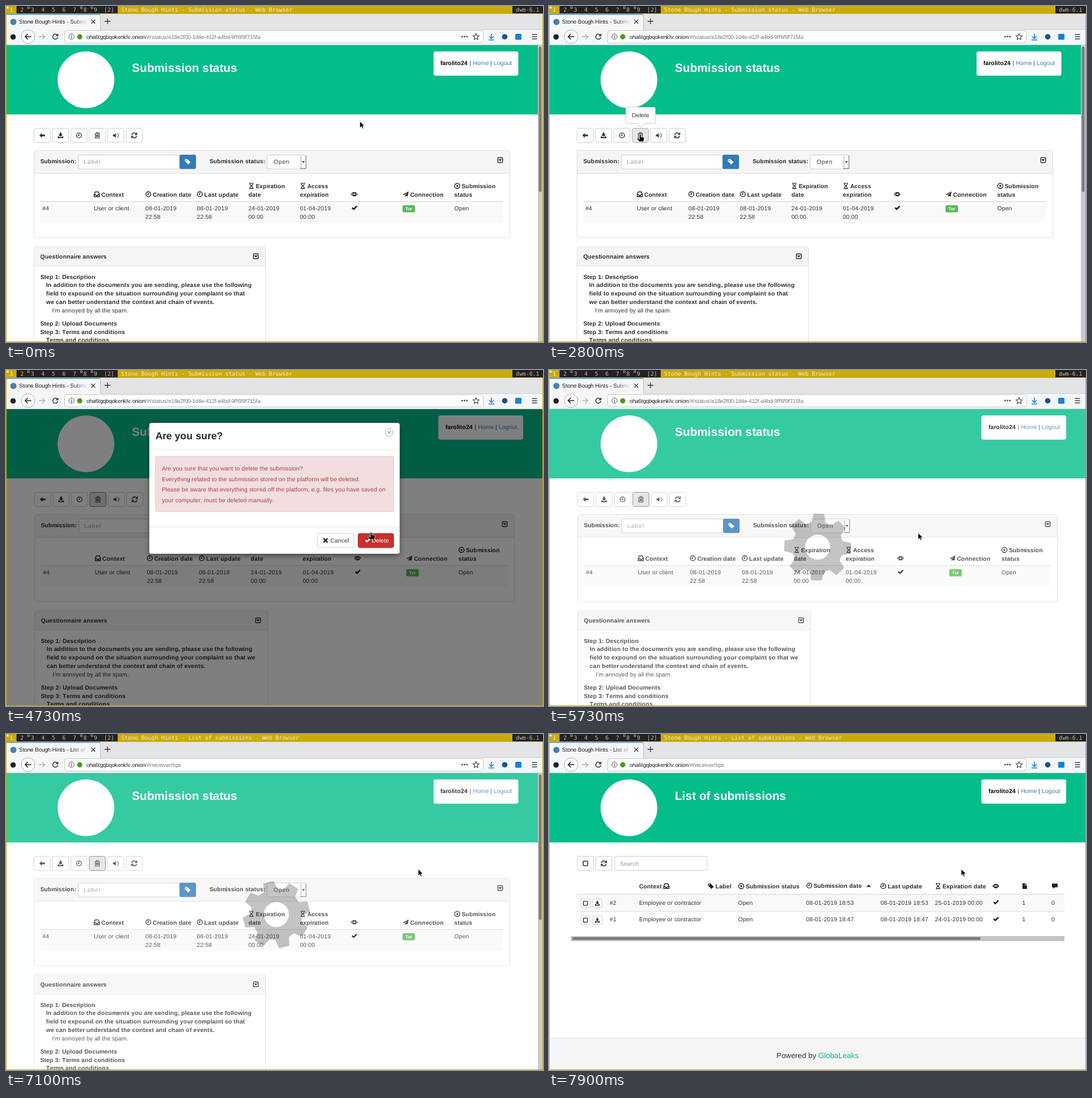
An HTML page that plays this animation: 947x592 px, repeating every 8 s.

```html
<!DOCTYPE html>
<html lang="en">
<head>
<meta charset="utf-8">
<title>Submission status</title>
<style>
html, body { margin: 0; width: 100%; height: 100%; overflow: hidden; background: #fff; }
svg { display: block; width: 947px; height: 592px; }
text { font-family: "Liberation Sans", Arial, sans-serif; fill: #333; white-space: pre; text-rendering: geometricPrecision; }
.b { font-weight: bold; fill: #2b2b2b; }
.m { font-family: "DejaVu Sans Mono", monospace; fill: #bbb; }
.u { fill: #1c1c1e; }
.h { font-weight: bold; fill: #fff; }
.a { fill: #337ab7; }
.r { fill: #a94442; }
.w { fill: #fff; }
</style>
</head>
<body>
<svg id="stage" viewBox="0 0 947 592"></svg>
<script>
const GREEN = '#03bd8b', GOLD = '#cbaa0c', PALE = '#f3ecd0';
const APP = 'Stone Bough Hints', USER = 'farolito24';
const ZOOM = .74; // a 1280x800 screen shown at 947x592

// Glyphs advance by whole screen pixels, as in hinted text
const pen = document.createElement('canvas').getContext('2d');
const SIZES = { m: 13.33, u: 13.33, h: 28 };
const widths = {};
function advance(ch, cls, px) {
  const key = cls + ch;
  if (!(key in widths)) {
    pen.font = cls === 'm' ? '100px "DejaVu Sans Mono", monospace'
      : (cls === 'b' || cls === 'h' ? 'bold ' : '') + '100px "Liberation Sans", Arial, sans-serif';
    widths[key] = pen.measureText(ch).width / 100;
  }
  return Math.round(widths[key] * px);
}
// align: 0 start, .5 middle, 1 end
function text(x, y, s, cls = '', { px = SIZES[cls] || 14, align = 0, gap = 0, fill = '' } = {}) {
  const steps = [...String(s)].map(ch => (advance(ch, cls, px) + gap) * ZOOM);
  let at = x - align * steps.reduce((a, b) => a + b, 0);
  const xs = steps.map(w => { const left = at; at += w; return left.toFixed(2); });
  return `<text x="${xs.join(' ')}" y="${y}" class="${cls}" font-size="${px * ZOOM}"${fill && ` style="fill:${fill}"`}>${s}</text>`;
}

const box = (x, y, w, h, fill, stroke = 'none', r = 0, extra = '') =>
  `<rect x="${x}" y="${y}" width="${w}" height="${h}" rx="${r}" fill="${fill}" stroke="${stroke}" ${extra}/>`;
const disc = (x, y, r, fill, stroke = 'none') => `<circle cx="${x}" cy="${y}" r="${r}" fill="${fill}" stroke="${stroke}"/>`;
const line = (d, color, w = 1) => `<path d="${d}" fill="none" stroke="${color}" stroke-width="${w}"/>`;
const group = (id, body = '') => `<g id="${id}">${body}</g>`;
const ring = r => `M${-r} 0a${r} ${r} 0 1 0 ${2 * r} 0a${r} ${r} 0 1 0 ${-2 * r} 0`;

// Each icon is centred on 0,0: path and stroke width (0 = filled)
const ICONS = {
  back: ['M-5 0L-.5-4.3V-1.4H5V1.4H-.5V4.3Z', 0],
  save: ['M-1.5-5H1.5V-1.5H4L0 2.5-4-1.5H-1.5ZM-5 1.8H-2.8L-1 3.4H1L2.8 1.8H5V5H-5Z', 0],
  clock: [ring(4.4) + 'M0-2.8V.4H-2.2', 1.4],
  trash: ['M-4.6-3.3H4.6M-1.6-3.5V-5H1.6V-3.5M-3.6-3V4.7H3.6V-3M-1.5-1.4V3M0-1.4V3M1.5-1.4V3', 1.1],
  sound: ['M-5-1.6H-3L0-4V4L-3 1.6H-5ZM1.2-1.8Q2.8 0 1.2 1.8ZM2.4-3.4Q6.4 0 2.4 3.4L3 4.2Q7.6 0 3-4.2Z', 0],
  sync: ['M-4.2-.8A4.3 4.3 0 0 1 3.4-2.8M4.6-5V-1.6H1.2M4.2.8A4.3 4.3 0 0 1-3.4 2.8M-4.6 5V1.6H-1.2', 1.5],
  tag: ['M-5-4.5H-.6L5 1 1 5-5-.7ZM-3-3.2a.9.9 0 1 0 .1 0Z', 0],
  caret: ['M-3.2-4.2H3.2Q4.2-4.2 4.2-3.2V3.2Q4.2 4.2 3.2 4.2H-3.2Q-4.2 4.2-4.2 3.2V-3.2Q-4.2-4.2-3.2-4.2ZM-1.8-.9H1.8L0 1Z', 1.4],
  inbox: ['M-2.8-4.2H2.8L4.6.6V4.2H-4.6V.6ZM-4.6.9H-2L-1 2.5H1L2 .9H4.6', 1.5],
  glass: ['M-3.8-4.8H3.8M-3.8 4.8H3.8M-2.8-4.8Q-2.8-1.5 0 0Q2.8-1.5 2.8-4.8M-2.8 4.8Q-2.8 1.5 0 0Q2.8 1.5 2.8 4.8M-1.5 4H1.5', 1.1],
  eye: ['M-5.2 0Q0-6.5 5.2 0Q0 6.5-5.2 0ZM0-2.3a2.1 2.1 0 1 0 .1 0Z', 1.3],
  plane: ['M5-5L3.2 4.3 .2 2.8-1.5 5V2L3-3-3 1.4-5.2.3Z', 0],
  target: [ring(4.5) + ring(1), 1.4],
  check: ['M-5 .3L-3.2-1.5-1.4.2 3.3-4.3 5-2.6-1.4 3.7Z', 0],
  cross: ['M-3.6-3.6L3.6 3.6M3.6-3.6L-3.6 3.6', 2.6],
  square: ['M-3-4H3Q4-4 4-3V3Q4 4 3 4H-3Q-4 4-4 3V-3Q-4-4-3-4Z', 1.6],
  file: ['M-4-5H.5V-1H4V5H-4ZM1.3-5L4-2H1.3Z', 0],
  chat: ['M-5-4.5H5V2H.5L-2.5 5V2H-5Z', 0],
  reload: ['M3.6-2.6A4.5 4.5 0 1 0 4.4 1M4.6-5V-1.4H1', 1.5],
  star: ['M0-5L1.5-1.6 5.2-1.3 2.4 1.1 3.3 4.8 0 2.8-3.3 4.8-2.4 1.1-5.2-1.3-1.5-1.6Z', 1.1]
};
function icon(name, x, y, color = '#2b2b2b', k = 1) {
  const [d, w] = ICONS[name];
  const paint = w ? `fill="none" stroke="${color}" stroke-width="${w}"` : `fill="${color}" fill-rule="evenodd"`;
  return `<path transform="translate(${x} ${y}) scale(${k})" d="${d}" ${paint}/>`;
}
const button = (x, y, w, h, name, cls = '', k = 1) =>
  box(x, y, w, h, '#fff', '#ccc', 3, `class="${cls}"`) + icon(name, x + w / 2, y + h / 2, '#333', k);

function head(title, wide) {
  const x = wide ? 763 : 754;
  return box(0, 68.8, 947, 122.2, GREEN) + disc(141, 130, 50, '#fff') + text(222, 116, title, 'h') +
    box(x - (wide ? .5 : 0), 80, 149.5, 42.8, '#fff', 'none', 4) +
    text(x + 60, 104, USER, 'b', { align: 1, fill: '#000' }) + text(x + 63.5, 104, '|') +
    text(x + 69.5, 104, 'Home', 'a') + text(x + 100, 104, '|') + text(x + 106, 104, 'Logout', 'a');
}

function statusPage(wide) {
  const L = wide ? 50 : 49, R = wide ? 897 : 889, half = wide ? 462 : 458;
  const col = k => L + 15.2 + k * (wide ? 91.6 : 90.8);
  let s = head('Submission status', wide);
  ['back', 'save', 'clock', 'trash', 'sound', 'sync'].forEach((n, i) => {
    s += button(L + .5 + i * 32.45, 215.5, 28.5, 25, n, n === 'trash' ? 'bin' : '');
  });
  s += box(L + .5, 254.5, R - L - 1, 153.5, '#fff', '#ddd', 3) + box(L + 1, 255, R - L - 2, 40, '#f5f5f5') +
    line(`M${L} 295H${R}`, '#ddd') + text(L + 11.5, 277, 'Submission:', 'b') +
    box(L + 78.5, 262.5, 179, 24.5, '#fff', '#ccc', 3) + text(L + 88, 278.2, 'Label', '', { gap: 1, fill: '#999' }) +
    box(L + 257.4, 262.4, 28.2, 24.4, '#337ab7', '#2e6da4', 2, 'stroke-width=".8"') + icon('tag', L + 271.5, 274.3, '#fff') +
    text(L + 310, 277, 'Submission status:', 'b') + box(L + 411.5, 262.5, 68, 24.5, '#fff', '#ccc', 2) +
    text(L + 423, 278.2, 'Open', '', { gap: .8 }) +
    line(`M${L + 471} 264V286M${L + 470} 286.5H${L + 480}V263`, '#777') + line(`M${L + 470.5} 264V286`, '#e3e3e3') +
    `<path d="M${L + 473} 273.5h5l-2.5 3z" fill="#222"/>` + icon('caret', R - 17.5, 271.5);
  s += box(L + 11.5, 345, R - L - 24, 36, '#f9f9f9') + line(`M${L + 11.5} 344.5H${R - 12}`, '#ddd', 1.5);

  const heads = [[1, 'inbox', 'Context'], [2, 'clock', 'Creation date'], [3, 'clock', 'Last update'],
    [4, 'glass', 'Expiration', 'date'], [5, 'glass', 'Access', 'expiration'], [6, 'eye', ''],
    [7, 'plane', 'Connection'], [8, 'target', 'Submission', 'status']];
  for (const [k, n, a, b] of heads) {
    const y = b ? 321 : 335.7;
    s += icon(n, col(k) + 5.2, y - 4, '#222') + text(col(k) + 13, y, a, 'b');
    if (b) s += text(col(k), 335.7, b, 'b');
  }
  const cells = ['#4', 'User or client', '08-01-2019', '08-01-2019', '24-01-2019', '01-04-2019', '', '', 'Open'];
  cells.forEach((c, k) => s += text(col(k), 359.8, c));
  ['22:58', '22:58', '00:00', '00:00'].forEach((c, k) => s += text(col(k + 2), 374.6, c));
  s += icon('check', col(6) + 5.5, 356, '#111') + box(col(7) - .5, 351, 22, 12.5, '#5cb85c', 'none', 2) +
    text(col(7) + 10.5, 360.2, 'Tor', 'b', { px: 10.5, align: .5, fill: '#fff' });

  s += box(L + .5, 424, half - L - 1, 180, '#fff', '#ddd', 3) + box(L + 1, 424.5, half - L - 2, 33, '#f5f5f5') +
    line(`M${L} 458H${half}`, '#ddd') + text(L + 11.5, 445, 'Questionnaire answers', 'b') + icon('caret', half - 17.5, 441);
  const we = wide ? [' we', ''] : ['', 'we '];
  [[0, 480.5, 'Step 1: Description'],
    [10.3, 495.3, 'In addition to the documents you are sending, please use the following'],
    [10.3, 510.1, 'field to expound on the situation surrounding your complaint so that' + we[0]],
    [10.3, 524.9, we[1] + 'can better understand the context and chain of events.'],
    [20.7, 539.7, "I'm annoyed by all the spam."], [0, 563, 'Step 2: Upload Documents'],
    [0, 577.6, 'Step 3: Terms and conditions'], [10.3, 592.2, 'Terms and conditions']
  ].forEach(([x, y, c], i) => s += text(L + 11.5 + x, y, c, i === 4 ? '' : 'b'));
  if (!wide) s += box(938, 68.8, 9, 523.2, '#c9c9c9') + box(939.5, 71.5, 5, 256, '#7d7d7d', 'none', 2.5);
  return s;
}

function listPage() {
  let s = head('List of submissions', true) + button(50, 215.5, 28.5, 25, 'square') + button(82.5, 215.5, 28.5, 25, 'sync') +
    box(116, 215.5, 163, 25, '#fff', '#ccc', 3) + text(125, 232, 'Search', '', { fill: '#999' });
  [[159, 'Context', 207, 'inbox'], [293.5, 'Label', 285.5, 'tag'], [347, 'Submission status', 339, 'target'],
    [466.5, 'Submission date', 459, 'clock'], [597.5, 'Last update', 589.5, 'clock'], [694, 'Expiration date', 686, 'glass'],
    [0, '', 788, 'eye'], [0, '', 839, 'file'], [0, '', 892, 'chat']
  ].forEach(([x, c, ix, n]) => {
    const y = n === 'clock' && x < 500 ? 271 : 272;
    s += text(x, y, c, 'b') + icon(n, ix, y - 4, '#222');
  });
  s += '<path d="M559.5 269.5h8.5l-4.250-4z" fill="#222"/>' + box(49.5, 283, 859.5, 29, '#f9f9f9') +
    line('M49.5 282.5H909', '#ddd', 1.5) + line('M49.5 312.5H909', '#ddd');
  [[300.5, '#2', '18:53', '25'], [330.2, '#1', '18:47', '24']].forEach(([y, id, at, day]) => {
    s += button(56, y - 10, 16.5, 15.5, 'square', '', .9) + button(77, y - 10, 16.5, 15.5, 'save', '', .85) +
      text(107, y, id) + text(159, y, 'Employee or contractor') + text(333.5, y, 'Open') +
      text(453.3, y, '08-01-2019 ' + at) + text(584.5, y, '08-01-2019 ' + at) + text(680.5, y, day + '-01-2019 00:00') +
      icon('check', 788.5, y - 3.8, '#111') + text(834.5, y, '1') + text(886, y, '0');
  });
  return s + box(38.5, 356, 870.5, 9, '#c4c4c4') + box(41, 358, 720, 4.8, '#7a7a7a', 'none', 2.4) +
    box(0, 535, 947, 57, '#f5f5f5') + line('M0 535.5H947', '#e5e5e5') +
    text(401, 571.3, 'Powered by', '', { px: 18 }) + text(475, 571.3, 'GlobaLeaks', '', { px: 18, fill: GREEN });
}

function chrome() {
  let s = box(0, 0, 947, 13.3, '#222') + box(0, 0, 18.5, 13.3, GOLD) + box(197, 0, 696, 13.3, GOLD) + box(0, 13.3, 947, 1, GOLD);
  for (let i = 1; i < 10; i++) s += text(6.6 + (i - 1) * 18.55, 10.2, i, 'm', { fill: i < 2 ? PALE : '' });
  s += box(1, 1, 3.5, 3.5, PALE);
  for (const x of [38, 131.5, 150]) s += box(x, 1.5, 3, 3, 'none', '#bbb', 0, 'stroke-width=".8"');
  s += text(173, 10.2, '[2]', 'm') + group('title') + text(899, 10.2, 'dwm-6.1', 'm');
  s += box(0, 14.1, 947, 28, '#e3e4e6') + box(1, 14.1, 165.5, 28, '#f5f6f7') + box(1, 14.1, 165.5, 1.4, '#2a8be8') +
    line('M166.5 16V41', '#bbb') + line('M166 41.5H947', '#d0d0d2') + disc(13, 28, 5.5, '#4d7fa8') +
    group('tab') + box(116, 18, 28, 20, 'url(#fade)') + box(144, 18, 20, 20, '#f5f6f7') +
    line('M150.5 24.2L157.2 31M157.2 24.2L150.5 31', '#333', 1.2) + line('M174 27H184M179 22V32', '#333', 1.3);
  s += box(0, 42, 947, 26.8, '#f5f6f7') + line('M0 68.4H947', '#c4c4c6', .74) + disc(12.5, 54.5, 4.8, '#222') +
    disc(39, 54, 12, '#fff', '#aaa') + line('M44.5 54H34M38.5 49.3L33.8 54L38.5 58.7', '#222', 1.6) +
    line('M58 54H68.5M64 49.5L68.5 54L64 58.5', '#b4b4b6', 1.5) + icon('reload', 87, 54, '#333') +
    box(103.5, 43.5, 738, 21.5, '#fff', '#c6c6c8', 3) + disc(115.5, 54, 4.7, 'none', '#555') +
    line('M115.5 53V57M115.5 51V52.2', '#555', 1.2) + disc(130, 54.3, 4.6, '#4b9a1c') +
    text(142, 57.7, 'oha6tgqbqokenklv.onion', 'u') + group('path');
  for (let i = 0; i < 3; i++) s += disc(804.5 + i * 4.2, 54, 1.4, '#444') + line(`M927.5 ${50.3 + i * 3.8}H936.5`, '#333', 1.4);
  return s + icon('star', 829, 54, '#444', 1.05) + line('M856 48.5V57M852 53.5L856 57.3L860 53.5M851 59.7H861', '#1080e8', 1.6) +
    disc(879.5, 54.2, 4.8, '#14528c') + box(898, 49, 11, 10.5, '#1583d8', 'none', 1.5);
}

const modal = box(1, 68.8, 945, 522.2, '#000', 'none', 0, 'opacity=".5"') +
  box(252.5, 93, 442, 231, '#fff', 'rgba(0,0,0,.25)', 4, 'filter="url(#soft)"') +
  text(263.5, 122, 'Are you sure?', 'b', { px: 24 }) +
  disc(675.8, 110, 6.9, 'none', '#aaa') + line('M673 107.2L678.6 112.8M678.6 107.2L673 112.8', '#aaa', 1.4) +
  line('M253 140H694M253 276.3H694', '#e5e5e5') + box(263.5, 152, 420, 97.5, '#f2dede', '#ebccd1', 3) +
  ['Are you sure that you want to delete the submission?',
    'Everything related to the submission stored on the platform will be deleted.',
    'Please be aware that everything stored off the platform, e.g. files you have saved on',
    'your computer, must be deleted manually.'].map((c, i) => text(275, 177 + i * 18.55, c, 'r')).join('') +
  box(549, 288, 64.5, 25, '#fff', '#ccc', 3) + icon('cross', 563.5, 300.3) + text(572, 304.3, 'Cancel') +
  box(621, 288, 62.5, 25, '#d9534f', '#d43f3a', 3, 'id="del"') + icon('check', 638, 300.5, '#fff') + text(645, 304.3, 'Delete', 'w');

function cog() {
  let d = '';
  for (let i = 0; i < 8; i++) {
    const a = i * Math.PI / 4;
    for (const [x, y] of [[-12.3, -43.5], [-9.3, -58.8], [9.3, -58.8], [12.3, -43.5]])
      d += `${d ? 'L' : 'M'}${(x * Math.cos(a) - y * Math.sin(a)).toFixed(1)} ${(x * Math.sin(a) + y * Math.cos(a)).toFixed(1)}`;
  }
  return `<path d="${d}Z${ring(22)}" fill-rule="evenodd" opacity=".23"/>`;
}

const stage = document.getElementById('stage');
stage.innerHTML = `<defs><linearGradient id="fade"><stop stop-color="#f5f6f7" stop-opacity="0"/><stop offset="1" stop-color="#f5f6f7"/></linearGradient>
  <filter id="soft" x="-5%" y="-5%" width="110%" height="115%"><feDropShadow dx="0" dy="3" stdDeviation="5" flood-opacity=".45"/></filter></defs>` +
  group('narrow', statusPage(false)) + group('wide', statusPage(true)) + group('list', listPage()) +
  group('modal', modal) + group('busy', box(0, 68.8, 938, 523.2, '#fff', 'none', 0, 'id="veil" opacity=".2"') + group('cog', cog())) +
  group('tip', '<path d="M139 178H184Q188 178 188 182V203Q188 207 184 207H168.5L162 213.5L155.5 207H139Q135 207 135 203V182Q135 178 139 178Z" fill="#fff" stroke="rgba(0,0,0,.22)"/>' +
    text(161.5, 196.3, 'Delete', '', { align: .5 })) +
  chrome() + line('M.5 14V591.5H946.5V14', GOLD) +
  group('arrow', '<path d="M0 0V11.6L2.7 9.2L4.6 13.3L6.5 12.4L4.7 8.4H8.2Z" stroke="#fff" stroke-width=".7"/>') +
  group('hand', '<path d="M-1.5 1Q-.2-.8 1 1V4.5L5.5 5.4Q7 6 6.7 8L5.5 13H-2L-5.5 8.5Q-5.5 6.5-3.5 7.3L-1.5 9Z" stroke="#fff" stroke-width=".7"/>');

const el = {};
stage.querySelectorAll('[id]').forEach(n => el[n.id] = n);
const bins = stage.querySelectorAll('.bin');
const show = (n, on) => n.setAttribute('display', on ? 'inline' : 'none');
const clamp = v => Math.max(0, Math.min(1, v));
function paint(n, fill, stroke) { n.setAttribute('fill', fill); n.setAttribute('stroke', stroke); }
function write(n, html) { if (n.said !== html) n.innerHTML = n.said = html; }

// Pointer track: time, x, y
const TRACK = [[0, 624, 203], [500, 624, 203], [620, 590, 172], [760, 480, 133], [900, 340, 122], [1050, 220, 129],
  [1180, 165, 150], [1300, 180, 174], [1440, 166, 211], [1570, 161, 218], [1720, 161, 226], [4070, 161, 226],
  [4250, 250, 233], [4430, 430, 256], [4620, 600, 279], [4800, 651, 287], [5900, 651, 287], [6100, 694, 256],
  [6300, 727, 238], [8000, 727, 238]];
function pointer(t) {
  let i = 0;
  while (i < TRACK.length - 2 && t >= TRACK[i + 1][0]) i++;
  const p = TRACK[i], q = TRACK[i + 1], h = q[0] - p[0], u = (t - p[0]) / h;
  const slope = (j, c) => {
    const a = TRACK[j - 1], b = TRACK[j], d = TRACK[j + 1];
    if (!a || !d || (a[1] === b[1] && a[2] === b[2]) || (d[1] === b[1] && d[2] === b[2])) return 0;
    return (d[c] - a[c]) / (d[0] - a[0]);
  };
  return [1, 2].map(c => {
    const u2 = u * u, u3 = u2 * u;
    return (2 * u3 - 3 * u2 + 1) * p[c] + (u3 - 2 * u2 + u) * h * slope(i, c) +
      (3 * u2 - 2 * u3) * q[c] + (u3 - u2) * h * slope(i + 1, c);
  });
}

function draw(t) {
  const listed = t >= 7230, wide = t >= 3570 && t < 5760, moved = t >= 6700;
  show(el.list, listed);
  show(el.wide, wide);
  show(el.narrow, !wide && !listed);
  show(el.modal, t >= 3570 && t < 5700);

  const name = moved ? 'List of submissions' : 'Submission status';
  write(el.title, text(203, 10.2, `${APP} - ${name} - Web Browser`, 'm', { fill: PALE }));
  write(el.tab, text(23, 31.2, `${APP} - ${moved ? 'List of' : 'Submiss'}`, 'u'));
  write(el.path, text(245.6, 57.7, '/#/' + (moved ? 'receiver/tips' : 'status/e18e2f00-1d4e-412f-a4bd-9ff6f9f715fa'), 'u', { fill: '#77777a' }));

  const [x, y] = pointer(t);
  const over = t >= 1330 && t < 3570 && y > 214;
  const bin = t >= 3430 ? ['#e0e0e0', '#777'] : t >= 3230 ? ['#d4d4d4', '#8c8c8c'] : over ? ['#e6e6e6', '#adadad'] : ['#fff', '#ccc'];
  bins.forEach(n => paint(n, ...bin));
  const onDelete = t > 4070 && t < 5700 && x > 621 && y > 281;
  paint(el.del, ...(t >= 5500 && t < 5530 ? ['#ac2925', '#761c19'] : onDelete ? ['#c9302c', '#ac2925'] : ['#d9534f', '#d43f3a']));

  const hand = (over && t < 3430) || onDelete;
  show(el.hand, hand);
  show(el.arrow, !hand);
  (hand ? el.hand : el.arrow).setAttribute('transform', `translate(${x.toFixed(2)} ${y.toFixed(2)})`);
  el.tip.setAttribute('opacity', clamp((t - 1600) / 160) * clamp((3870 - t) / 270));

  const full = wide || listed;
  show(el.busy, t >= 5700 && t < 7900);
  el.veil.setAttribute('width', full ? 947 : 938);
  // the spinner stalls briefly while the address changes
  const turn = (t - 5725 - 164 * clamp((t - 6600) / 164)) * .36;
  el.cog.setAttribute('transform', `translate(${full ? 473.5 : 469} 320) rotate(${turn.toFixed(2)}) translate(0 -8)`);
}

function tick(now) {
  draw(now % 8000);
  requestAnimationFrame(tick);
}
draw(0);
requestAnimationFrame(tick);
</script>
</body>
</html>
```
